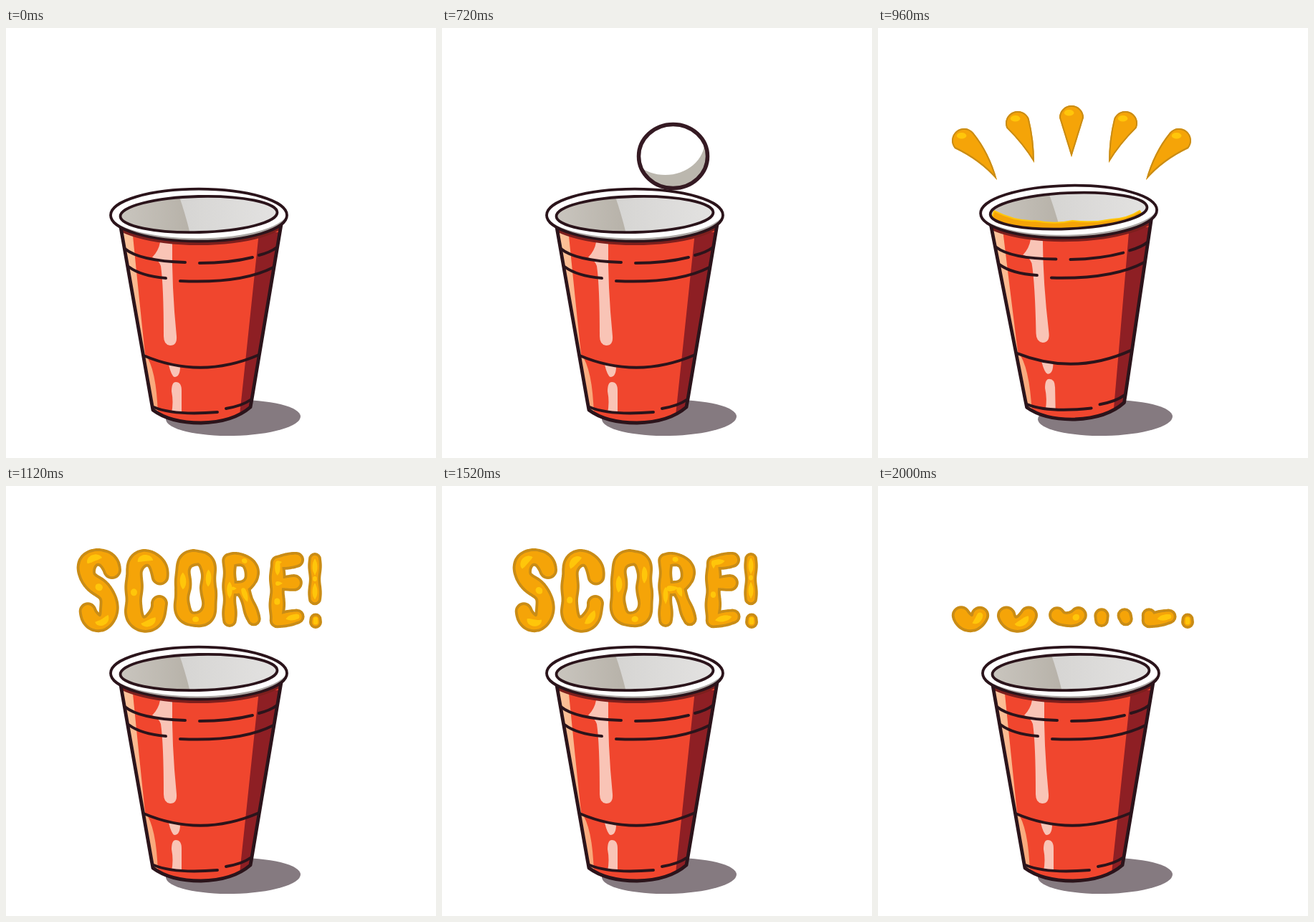
Recreate the animation shown at these times as an HTML page with a canvas. Size 600 by 600 pixels, loop 2.08 s.

```html
<!DOCTYPE html>
<html lang="en">
<head>
<meta charset="utf-8">
<title>Score</title>
<style>
  html, body { margin: 0; width: 100%; height: 100%; overflow: hidden; background: #fff; }
  canvas { display: block; width: 600px; height: 600px; }
  svg { position: absolute; width: 0; height: 0; }
</style>
</head>
<body>
<canvas id="stage" width="600" height="600"></canvas>
<!-- letter skeletons, fleshed out with round lumps of radius data-r -->
<svg>
  <path data-r="13" d="M148 117 C143 92 111 95 112 117 C113 143 144 136 144 168 C144 200 118 196 114 174"/>
  <path data-r="12.5" d="M215 126 C214 94 180 92 179 120 L178 172 C178 202 213 200 214 163"/>
  <path data-r="11.5" d="M265 100 C241 100 248 125 247 142 C243 170 245 186 265 186 C285 186 286 170 282 142 C282 125 288 100 265 100"/>
  <path data-r="10" d="M312 187 L312 104 C351 92 355 146 316 143 M331 145 L346 186"/>
  <path data-r="11" d="M405 103 L379 107 L378 188 L407 182 M379 136 L403 135"/>
  <path data-r="9" d="M431 102 L431 157"/>
  <path data-r="8.5" d="M432 186 L432 190"/>
</svg>
<script>
const ctx = document.getElementById('stage').getContext('2d');
const LOOP = 2080, STEP = 80, TAU = Math.PI * 2;
const INK = '#2b141b', RED = '#f0462e', DARK_RED = '#8e1f24';
const GOLD = '#f5a408', GOLD_EDGE = '#c98c16', GOLD_LIGHT = '#ffc60a';

// ---------- helpers ----------
function fill(path, color, rule = 'nonzero') {
  ctx.fillStyle = color;
  ctx.fill(path, rule);
}

function line(path, width, color = INK) {
  ctx.strokeStyle = color;
  ctx.lineWidth = width;
  ctx.lineCap = ctx.lineJoin = 'round';
  ctx.stroke(path);
}

function inside(path, draw) {
  ctx.save();
  ctx.clip(path);
  draw();
  ctx.restore();
}

function oval(x, y, rx, ry = rx, turn = 0) {
  const p = new Path2D();
  p.ellipse(x, y, rx, ry, turn, 0, TAU);
  return p;
}

function ring(outer, hole) {
  const p = new Path2D(outer);
  p.addPath(hole);
  return p;
}

function tone(x0, x1, a, b) {
  const g = ctx.createLinearGradient(x0, 0, x1, 0);
  g.addColorStop(0, a);
  g.addColorStop(1, b);
  return g;
}

// ---------- cup ----------
const body = new Path2D('M159 272 L203 522 L205 533 Q229 551 272 551 Q317 550 341 529 L343 518 L384 274 Z');
const rim = oval(269, 261.2, 123, 36.5);
const mouth = oval(269, 260, 109.5, 25, -.025);
const glow = new Path2D('M155 272 L177 290 Q185 370 194 455 Q210 475 212 540 H180 Z');
const shade = new Path2D('M353 285 H390 L345 540 H326 L335 456 Z');
const shine = new Path2D('M215 299 H232 Q231 360 238 430 Q239 443 229 443 Q220 442 220 430 Q220 360 216 332 Q212 322 204 320 Q213 311 215 299 Z');
const shineLow = new Path2D('M227 470 L243 472 Q243 487 235 487 Q231 486 227 470 Z M237 494 Q245 494 245 506 V537 H231 Q234 522 231 507 Q231 494 237 494 Z');
const grooves = new Path2D(
  'M166 308 Q186 325 250 327 M270 328 Q312 328 344 320 M353 317 Q369 313 378 306 ' +
  'M171 333 Q188 346 223 349 M243 353 Q328 357 373 334 ' +
  'M192 457 Q272 491 353 456 M206 529 Q235 541 295 536 M307 531 Q330 527 341 519');
const mouthShade = new Path2D('M140 220 L238 225 Q250 256 260 300 H140 Z');
const surface = new Path2D('M165 258 Q195 274 222 273 Q250 279 274 274 Q302 278 329 273 Q350 273 368 262 L390 300 H150 Z');

function drawCup(deg, lift, full) {
  fill(oval(317, 544, 94, 25, -.02), '#857a80');
  ctx.save();
  ctx.translate(270.5, 404.5 - lift);
  ctx.rotate(deg * Math.PI / 180);
  ctx.translate(-270.5, -404.5);

  fill(body, RED);
  inside(body, () => {
    fill(glow, tone(165, 212, '#fcc39b', '#f9a678'));
    fill(shade, DARK_RED);
    fill(shine, '#f9c4b6');
    fill(shineLow, '#f9c4b6');
    line(oval(269, 264, 123, 36.5), 5, '#7d1f1d');
  });
  line(grooves, 4);
  line(body, 4.8);

  fill(rim, '#fff');
  inside(rim, () => fill(ring(oval(269, 261, 126, 39), oval(267, 254, 128, 39.5)), '#aaa6a3', 'evenodd'));
  line(rim, 3.8);
  fill(mouth, tone(245, 380, '#d6d5d3', '#e3e2e1'));
  inside(mouth, () => {
    fill(mouthShade, tone(165, 255, '#c8c4bd', '#b7b2a9'));
    if (full) {
      fill(surface, GOLD);
      line(surface, 2, GOLD_LIGHT);
    }
  });
  line(mouth, 3.8);
  ctx.restore();
}

// ---------- ball ----------
function drawBall(x, y) {
  const ball = oval(x, y, 48, 44.5);
  fill(ball, '#fff');
  inside(ball, () => fill(ring(oval(x, y, 60), oval(x - 11, y - 21, 55, 47)), '#bbb7ae', 'evenodd'));
  line(ball, 5.5, '#351a23');
}

// ---------- splash ----------
// teardrop with a round head at x, y and a bent tail
function drop(x, y, r, tx, ty, bend) {
  const a = Math.atan2(y - ty, x - tx), nx = -Math.sin(a), ny = Math.cos(a);
  const mx = (x + tx) / 2, my = (y + ty) / 2, p = new Path2D();
  const b = bend + r / 2, c = bend - r / 2;
  p.moveTo(tx, ty);
  p.quadraticCurveTo(mx + nx * b, my + ny * b, x + nx * r, y + ny * r);
  p.arc(x, y, r, a + Math.PI / 2, a - Math.PI / 2, true);
  p.quadraticCurveTo(mx + nx * c, my + ny * c, tx, ty);
  fill(p, GOLD);
  inside(p, () => {
    line(p, 4, GOLD_EDGE);
    fill(oval(x - r * .2, y - r * .4, r * .4, r * .25), GOLD_LIGHT);
  });
}

function dot(x, y, r) {
  fill(oval(x, y, r), GOLD_EDGE);
  fill(oval(x, y, r - 1), GOLD);
}

function drawSplash(s) {
  if (s === 11) {
    drop(168, 206, 13, 198, 243, 7);
    drop(426, 212, 11, 386, 235, -6);
    dot(425.5, 251, 5);
  } else {
    const reach = s === 10 ? .55 : 1;
    for (let i = -2; i <= 2; i++) {
      const y = 240 - reach * (115 - 8 * i * i);
      drop(270 + i * 75 * reach, y, 17 * reach, 270 + i * 52 * reach, y + 55 * reach, -4 * i);
    }
  }
}

// ---------- lettering ----------
const word = [...document.querySelectorAll('path')].map(path => {
  const size = path.getTotalLength(), base = +path.dataset.r, box = path.getBBox(), lumps = [];
  for (let d = 0; d <= size; d++) {
    const { x, y } = path.getPointAtLength(d);
    lumps.push({ x, y, at: d / size, r: base + .8 * Math.sin(d / 6) });
  }
  return { lumps, size, cx: box.x + box.width / 2, cy: box.y + box.height / 2 };
});

function lumpPath(lumps, radius) {
  const p = new Path2D();
  for (const l of lumps) {
    const r = radius(l);
    if (r <= 0) continue;
    p.moveTo(l.x + r, l.y);
    p.arc(l.x, l.y, r, 0, TAU);
  }
  return p;
}

// level: liquid above it is gone; spread: 1 is the finished letter
function drawWord(phase, level = 0, spread = 1) {
  word.forEach(({ lumps, size, cx, cy }, k) => {
    const left = lumps.filter(l => l.y > level).map(l => ({
      ...l, x: cx + (l.x - cx) * spread, y: cy + (l.y - cy) * spread
    }));
    fill(lumpPath(left, l => l.r), GOLD_EDGE);
    fill(lumpPath(left, l => l.r - 3.8), GOLD);
    // sheens slide along the skeleton and taper at their ends
    [.2, .5, .82].forEach((home, i) => {
      const mid = home + .06 * Math.sin(TAU * phase + k * (phase % 1 ? 1 : 0));
      const half = i === 1 ? 3 : 12;
      const sheen = lumpPath(left, l => l.r * .36 * (1 - ((l.at - mid) * size / half) ** 2));
      fill(sheen, GOLD_LIGHT);
    });
  });
}

// ---------- timeline ----------
function draw(s) {
  ctx.fillStyle = '#fff';
  ctx.fillRect(0, 0, 600, 600);

  // the cup rocks around its strongest kick, then settles
  const kick = s - 11, rocking = s >= 10 && s <= 13;
  const fade = rocking ? .55 ** Math.abs(kick) : 0;
  drawCup(6.5 * Math.cos(kick * 1.9) * fade, 9 * fade, rocking && s < 13);

  const hop = s - 7;
  if (hop >= 0 && hop < 3) drawBall(578.5 - 128 * hop, 139 - 34 * hop + 27 * hop * hop);

  if (s >= 10 && s <= 12) drawSplash(s);
  else if (s === 13) drawWord(0, 0, .65);
  else if (s >= 14) {
    const phase = s < 18 ? (s - 14) / 3 : 1 + (s - 18) / 8;
    drawWord(phase, s >= 23 ? 120 + 30 * (s - 23) : 0);
  }
}

const start = performance.now();
function tick() {
  draw(Math.floor((performance.now() - start) % LOOP / STEP));
  requestAnimationFrame(tick);
}
tick();
</script>
</body>
</html>
```
